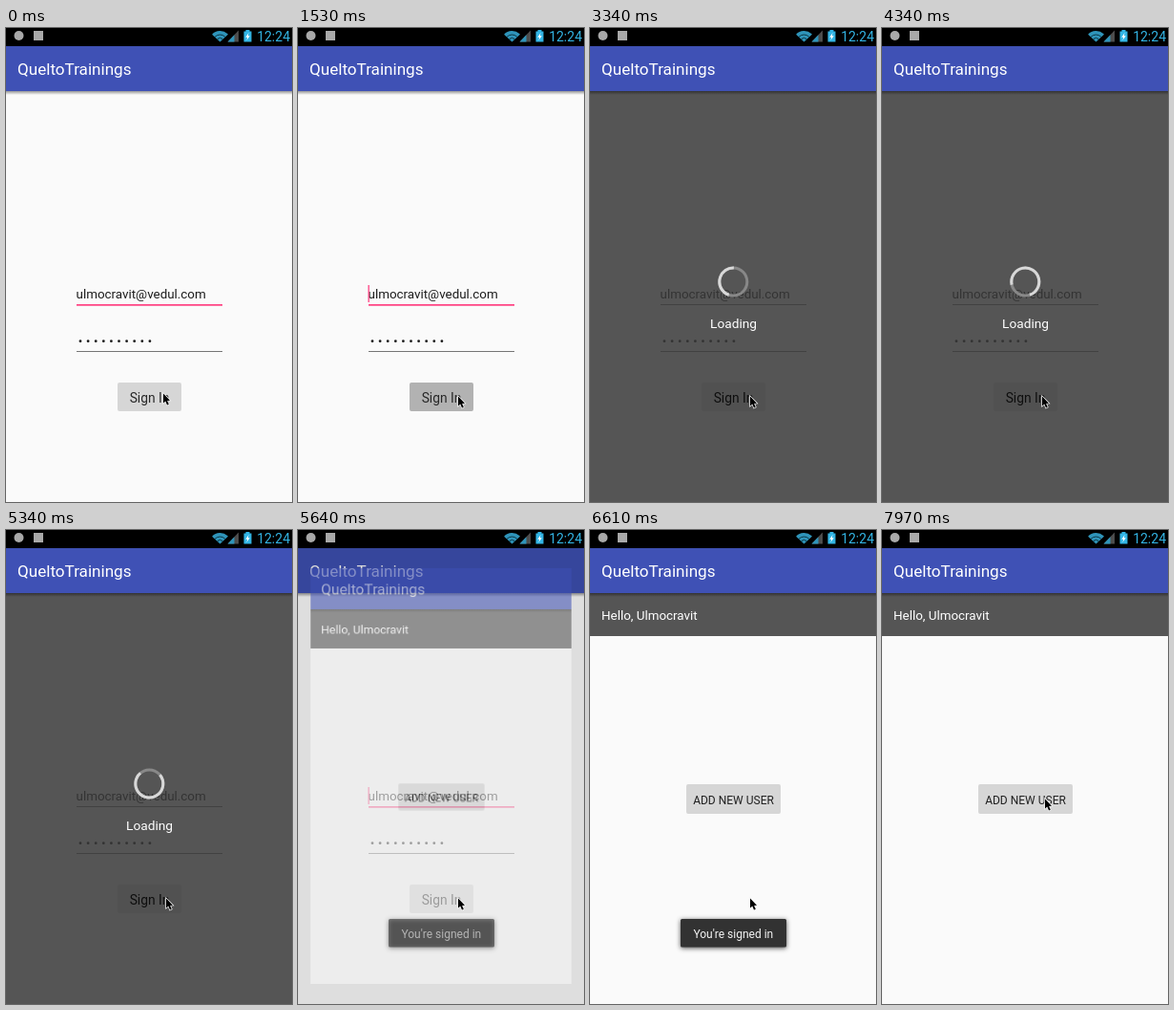
Animation of 300x496 px, one loop 8000 ms. Source, as an HTML page with a canvas:

```html
<!DOCTYPE html>
<html lang="en">
<head>
<meta charset="utf-8">
<title>Sign in flow</title>
<style>
html, body { margin: 0; width: 100%; height: 100%; overflow: hidden; background: #fafafa; }
canvas { display: block; width: 300px; height: 496px; }
</style>
</head>
<body>
<canvas id="stage"></canvas>
<script>
const W = 300, H = 496, LOOP = 8000, TAU = Math.PI * 2;
const STATUS_H = 19, BAR_BOTTOM = 66;
const APP = 'QueltoTrainings', USER = 'Ulmocravit', EMAIL = 'ulmocravit@vedul.com';
const PAPER = '#fafafa', INK = '#1c1c1c', PRIMARY = '#3f51b5', ACCENT = '#ff4081', CYAN = '#33b5e5';

const ratio = window.devicePixelRatio || 1;
function fit(canvas) {
  canvas.width = W * ratio;
  canvas.height = H * ratio;
  const c = canvas.getContext('2d');
  c.scale(ratio, ratio);
  return c;
}
const stage = fit(document.getElementById('stage'));
const layer = document.createElement('canvas');
const layerCtx = fit(layer);

const clamp = x => Math.min(1, Math.max(0, x));
const ramp = (t, from, to) => clamp((t - from) / (to - from));
const smooth = x => x * x * (3 - 2 * x);
const mix = (a, b, k) => a + (b - a) * k;
const grey = v => `rgb(${v},${v},${v})`;

function box(c, x, y, w, h, fill) {
  c.fillStyle = fill;
  c.fillRect(x, y, w, h);
}

function card(c, x, y, w, h, r, fill) {
  c.fillStyle = fill;
  c.beginPath();
  c.roundRect(x, y, w, h, r);
  c.fill();
}

function label(c, text, x, y, size, fill, align = 'left') {
  c.font = `${size}px Roboto, sans-serif`;
  c.textAlign = align;
  c.fillStyle = fill;
  c.fillText(text, x, y);
}

function shape(c, points, fill) {
  c.fillStyle = fill;
  c.beginPath();
  points.forEach(([x, y]) => c.lineTo(x, y));
  c.closePath();
  c.fill();
}

function statusBar(c) {
  box(c, 0, 0, W, STATUS_H, '#000');
  c.fillStyle = '#a9a9a9';
  c.beginPath();
  c.arc(13.5, 8, 5, 0, TAU);
  c.fill();
  box(c, 29, 3, 10, 10, '#a9a9a9');

  // wifi fan
  c.fillStyle = '#2f95bb';
  c.beginPath();
  c.moveTo(224.5, 14.5);
  c.arc(224.5, 14.5, 11.5, -Math.PI * 0.76, -Math.PI * 0.24);
  c.fill();
  c.strokeStyle = '#0a3442';
  c.lineWidth = 1;
  for (const r of [4, 7.5]) {
    c.beginPath();
    c.arc(224.5, 14.5, r, -Math.PI * 0.76, -Math.PI * 0.24);
    c.stroke();
  }

  // signal wedge and battery
  shape(c, [[244, 2.5], [244, 14.5], [232.5, 14.5]], '#4d4d4d');
  shape(c, [[239.5, 7.2], [239.5, 14.5], [232.5, 14.5]], '#2f95bb');
  box(c, 251.5, 2, 4, 2, CYAN);
  box(c, 249.5, 3.5, 8, 11, CYAN);
  shape(c, [[254.5, 5], [251.3, 9.7], [253.2, 9.7], [252.3, 13], [255.8, 8.2], [253.8, 8.2]], '#fff');
  label(c, '12:24', 298, 13.5, 14, CYAN, 'right');
}

function toolbar(c) {
  const g = c.createLinearGradient(0, BAR_BOTTOM, 0, BAR_BOTTOM + 4);
  g.addColorStop(0, 'rgba(0,0,0,.4)');
  g.addColorStop(1, 'rgba(0,0,0,0)');
  box(c, 0, BAR_BOTTOM, W, 4, g);
  box(c, 0, STATUS_H, W, BAR_BOTTOM - STATUS_H, PRIMARY);
  label(c, APP, 12, 48.7, 17.1, '#fff');
}

// 0 to 1: how far the loading dialog covers the form.
const cover = t => ramp(t, 1560, 1670) * (1 - ramp(t, 5450, 5680));

function signIn(c, t) {
  const dim = cover(t);
  box(c, 0, STATUS_H, W, H - STATUS_H, PAPER);

  // the fields fade and lose focus behind the dialog
  c.globalAlpha = mix(1, 0.45, dim);
  label(c, EMAIL, 73.5, 283.3, 13.4, INK);
  if (dim < 0.5) {
    box(c, 74, 289, 153, 1.7, ACCENT);
    if (Math.floor(t / 500) % 2) box(c, 73.5, 269, 1.3, 18, ACCENT);
  } else {
    box(c, 74, 289, 153, 1, '#757575');
  }
  c.fillStyle = INK;
  for (let i = 0; i < 10; i++) {
    c.beginPath();
    c.arc(78 + i * 8.1, 327.7, 1.4, 0, TAU);
    c.fill();
  }
  box(c, 74, 338, 153, 1, '#757575');

  const press = ramp(t, 1400, 1500) * (1 - ramp(t, 1570, 1670));
  c.globalAlpha = mix(1, 0.35, dim);
  card(c, 117, 371, 67, 30, 2, grey(Math.round(mix(214, 178, press))));
  c.globalAlpha = 1;
  label(c, 'Sign In', 150.5, 391.7, 13.8, '#282828', 'center');
}

function home(c) {
  box(c, 0, STATUS_H, W, H - STATUS_H, PAPER);
  box(c, 0, BAR_BOTTOM, W, 45, '#555');
  label(c, `Hello, ${USER}`, 12, 93.7, 13.4, '#fff');
  card(c, 101, 266, 99, 31, 2, grey(214));
  label(c, 'ADD NEW USER', 150.5, 286.7, 12, '#222', 'center');
  toolbar(c);
}

// An arc that grows, rests, shrinks from its tail and rests again while turning.
function spinner(c, t) {
  const MOVE = 460, REST = 120, CYCLE = 2 * (MOVE + REST), SWEEP = 254;
  const since = t - 5340 + 465 + 10 * CYCLE;
  const phase = since % CYCLE;
  const ease = x => (1 - Math.cos(Math.PI * clamp(x))) / 2;
  const grow = ease(phase / MOVE);
  const shrink = ease((phase - MOVE - REST) / MOVE);
  const turns = Math.floor(since / CYCLE) - 10;
  const from = (320 + (t - 5340) * 0.265 + SWEEP * (turns + shrink)) * Math.PI / 180;
  const span = (16 + SWEEP * (grow - shrink)) * Math.PI / 180;

  c.lineWidth = 3;
  c.strokeStyle = '#888';
  c.beginPath();
  c.arc(150.3, 265.5, 14.5, 0, TAU);
  c.stroke();
  c.strokeStyle = '#d8d8d8';
  c.beginPath();
  c.arc(150.3, 265.5, 14.5, from, from + span);
  c.stroke();
}

function loading(c, t) {
  box(c, 0, STATUS_H, W, H - STATUS_H, `rgba(0,0,0,${0.66 * cover(t)})`);
  c.globalAlpha = ramp(t, 1560, 1670) * (1 - ramp(t, 5450, 5560));
  if (c.globalAlpha > 0) {
    spinner(c, t);
    label(c, 'Loading', 150.5, 314, 13.7, '#fff', 'center');
  }
  c.globalAlpha = 1;
}

function toast(c, t) {
  const alpha = ramp(t, 5520, 5720) * (1 - ramp(t, 7350, 7600));
  if (!alpha) return;
  c.save();
  c.globalAlpha = alpha;
  c.shadowColor = 'rgba(0,0,0,.7)';
  c.shadowBlur = 5 * ratio;
  c.shadowOffsetY = ratio;
  card(c, 95, 407, 111, 29.5, 1.5, '#323232');
  c.shadowColor = 'transparent';
  label(c, "You're signed in", 150.3, 426.6, 12, '#f4f4f4', 'center');
  c.restore();
}

function pointer(c, t) {
  const settle = smooth(ramp(t, 250, 700));
  const rise = smooth(ramp(t, 6750, 7400));
  c.save();
  c.translate(165 + 3 * settle + 3 * rise, 382.5 + 3 * settle - 104 * rise);
  c.beginPath();
  [[0, 0], [0, 10], [2.3, 8], [4, 12], [5.8, 11.2], [4.1, 7.4], [7, 7.2]]
    .forEach(([px, py]) => c.lineTo(px, py));
  c.closePath();
  c.strokeStyle = '#f4f4f4';
  c.lineWidth = 1.4;
  c.stroke();
  c.fillStyle = '#000';
  c.fill();
  c.restore();
}

function draw(t) {
  const c = stage;
  const enter = 1 - (1 - ramp(t, 5540, 5840)) ** 2;

  if (enter < 1) {
    signIn(c, t);
    loading(c, t);
    toolbar(c);
    box(c, 0, STATUS_H, W, BAR_BOTTOM - STATUS_H, `rgba(0,0,0,${0.25 * enter})`);
  }
  if (enter > 0) {
    home(layerCtx);
    const scale = 0.8 + 0.2 * enter;
    const mid = (STATUS_H + H) / 2;
    c.save();
    c.globalAlpha = enter;
    c.translate(W / 2, mid);
    c.scale(scale, scale);
    c.translate(-W / 2, -mid);
    c.beginPath();
    c.rect(0, STATUS_H, W, H - STATUS_H);
    c.clip();
    c.drawImage(layer, 0, 0, W, H);
    c.restore();
  }
  statusBar(c);
  toast(c, t);
  pointer(c, t);
}

const start = performance.now();
function tick() {
  draw((performance.now() - start) % LOOP);
  requestAnimationFrame(tick);
}
tick();
</script>
</body>
</html>
```
